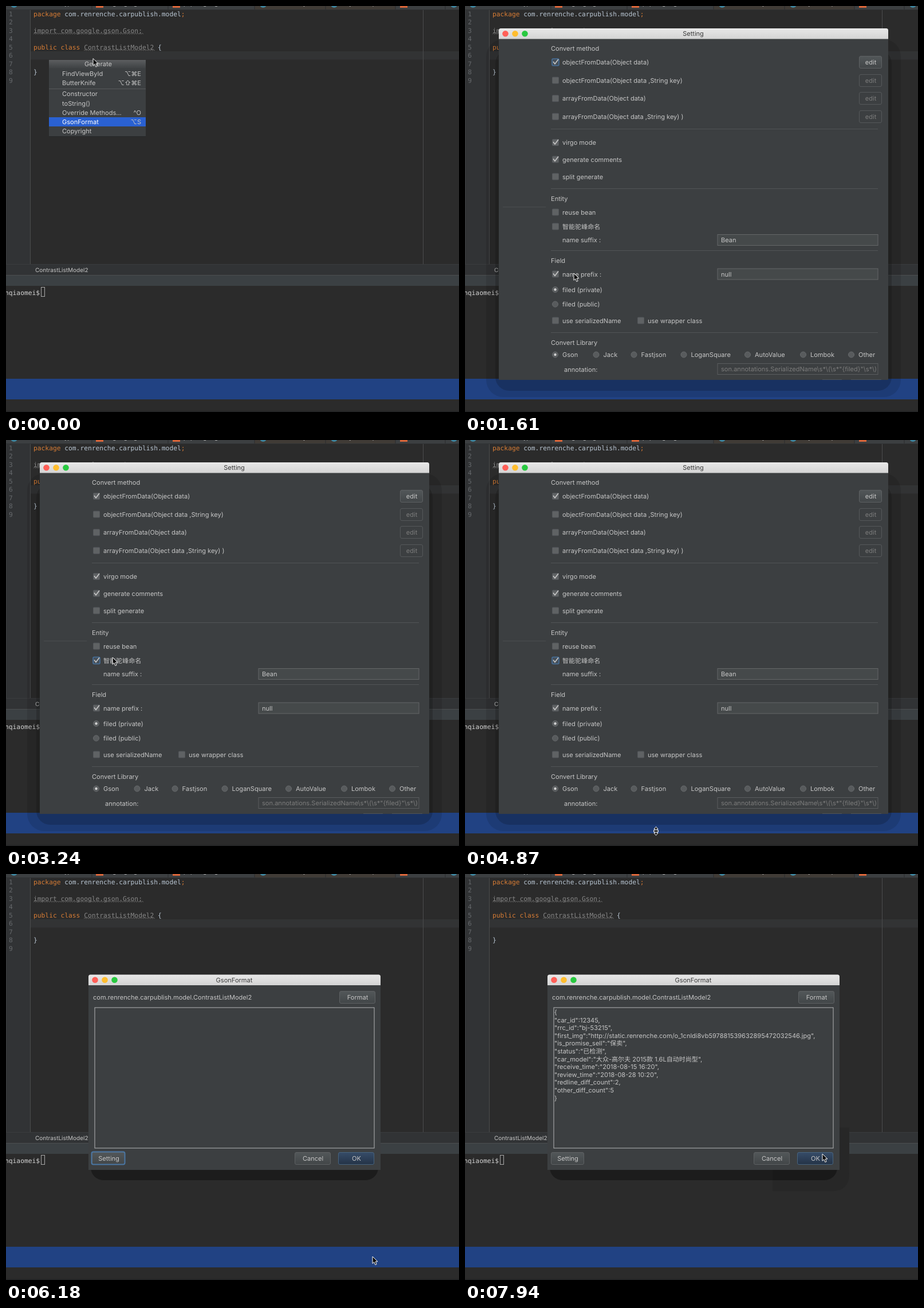
Recreate the animation shown at these times as an HTML page. Size 791 px wide and 708 px high, loop 8000 ms.

```html
<!DOCTYPE html>
<html lang="en">
<head>
<meta charset="utf-8">
<title>Generate a model class from JSON</title>
<style>
html, body { margin: 0; width: 100%; height: 100%; overflow: hidden; background: #2b2b2b; }
svg { display: block; width: 791px; height: 708px; }
text { font: 11.05px Inter, "Noto Sans CJK SC", "Noto Sans CJK", "DejaVu Sans", sans-serif; fill: #c6c6c6; white-space: pre; text-rendering: geometricPrecision; }
.code { font: 11.27px "DejaVu Sans Mono", monospace; fill: #b9c6d3; }
.shell { fill: #d2d2d2; }
.kw { fill: #d67c35; }
.unused { fill: #868686; }
.num { fill: #65686b; }
.small { font-size: 10px; }
.title { fill: #3c3c3c; }
.off { fill: #7c7c7c; }
.mid { text-anchor: middle; }
.end { text-anchor: end; }
.timed { animation: 8s step-end infinite; }
</style>
</head>
<body>
<svg id="stage" viewBox="0 0 791 708">
  <defs>
    <linearGradient id="bar" x2="0" y2="1"><stop stop-color="#e8e8e8"/><stop offset="1" stop-color="#d4d4d4"/></linearGradient>
    <linearGradient id="head" x2="0" y2="1"><stop stop-color="#5c5e60"/><stop offset="1" stop-color="#3e4143"/></linearGradient>
    <linearGradient id="btn" x2="0" y2="1"><stop stop-color="#525759"/><stop offset="1" stop-color="#424648"/></linearGradient>
    <linearGradient id="main" x2="0" y2="1"><stop stop-color="#364c68"/><stop offset="1" stop-color="#243347"/></linearGradient>
  </defs>
</svg>
<script>
const LOOP = 8000;
const stage = document.getElementById('stage');
const sheet = document.createElement('style');

const pct = ms => (ms / LOOP * 100).toFixed(3) + '%';
const attrs = o => Object.entries(o).map(([k, v]) => `${k}="${v}"`).join(' ');
const rect = (x, y, w, h, fill, more = {}) =>
  `<rect ${attrs({ x, y, width: w, height: h, fill, ...more })}/>`;
const circle = (cx, cy, r, fill, more = {}) => `<circle ${attrs({ cx, cy, r, fill, ...more })}/>`;
const path = (d, stroke, width = 1, fill = 'none') =>
  `<path ${attrs({ d, stroke, 'stroke-width': width, fill })}/>`;
const text = (x, y, str, cls = '') => `<text x="${x}" y="${y}" class="${cls}">${str}</text>`;
const hline = (x1, x2, y, color = '#515456') => path(`M${x1} ${y}H${x2}`, color);

// Wraps content that is visible only during the given [from, to] spans
let timedCount = 0;
function timed(content, ...spans) {
  const name = 'show' + timedCount++;
  const steps = spans.map(([a, b]) => `${pct(a)}{opacity:1}${pct(b)}{opacity:0}`).join('');
  sheet.textContent += `@keyframes ${name}{0%{opacity:0}${steps}}\n`;
  return `<g class="timed" style="animation-name:${name}">${content}</g>`;
}

function button(x, y, w, label, kind = '') {
  const fill = { main: 'url(#main)', off: 'none' }[kind] || 'url(#btn)';
  const stroke = { main: '#48647e', off: '#55585a' }[kind] || '#5e6163';
  return rect(x + .5, y + .5, w - 1, 21, fill, { stroke, rx: 2.5 }) +
    text(x + w / 2 + .5, y + 15, label, 'mid ' + kind);
}
const field = (y, str, off) =>
  rect(441, y, 280, 19, off ? '#3c3f41' : '#45494a', { stroke: off ? '#5a5d5f' : '#646768' }) +
  text(447, y + 13.5, str, off ? 'off' : '');
const tick = (x, y) => path(`M${x + 3} ${y - 1}l3 4 6-8`, '#c8c8c8', 1.6);
const box = (x, y, checked) =>
  rect(x + .5, y - 5.5, 11, 11, '#5f6264', { rx: 1, stroke: '#53565a' }) + (checked ? tick(x - 1, y) : '');
const focusBox = y =>
  rect(152, y - 6, 12, 12, '#46505a', { rx: 2, stroke: '#456f9b', 'stroke-width': 1.6 }) + tick(151, y);
const check = (x, y, label, checked) => box(x, y, checked) + text(x + 18, y + 4, label);
const radio = (cx, y, label, on) =>
  circle(cx, y, 5, '#585b5d', { stroke: '#676a6c' }) + (on ? circle(cx, y, 2.2, '#d0d0d0') : '') +
  text(cx + 12.5, y + 4, label);
const shadow = (x, y, right, bottom, r, alpha) =>
  rect(x, y, right - x, bottom - y, '#000', { rx: r, opacity: alpha });

function windowFrame(x, y, right, bottom, title) {
  const lights = ['#ff5f57', '#ffbd2e', '#28c940'];
  return rect(x, y + 8, right - x, bottom - y - 8, '#3c3f41') +
    path(`M${x} ${y + 18.5}v-15q0-3.5 3.5-3.5H${right - 3.5}q3.5 0 3.5 3.5v15z`, 'none', 0, 'url(#bar)') +
    lights.map((c, i) => circle(x + 11.5 + 17 * i, y + 9.3, 5.3, c)).join('') +
    text((x + right) / 2 - .5, y + 13.3, title, 'title mid');
}

function zigzag(x1, x2, y) {
  let d = `M${x1} ${y}`;
  for (let x = x1; x < x2; x += 4) d += 'l2-1.6 2 1.6';
  return path(d, '#707070', .8);
}

function editor() {
  const span = (cls, s) => `<tspan class="${cls}">${s}</tspan>`;
  const row = n => 18 + (n - 1) * 14.45;
  const lines = {
    1: span('kw', 'package ') + 'com.renrenche.carpublish.model' + span('kw', ';'),
    3: span('unused', 'import com.google.gson.Gson;'),
    5: span('kw', 'public class ') + span('unused', 'ContrastListModel2') + ' {',
    8: '}'
  };
  let out = rect(0, 0, 791, 708, '#2b2b2b') + rect(0, 0, 42, 451, '#313335') +
    rect(43, 79, 748, 14.5, '#323334') +
    path('M42.5 6V451M728.5 6V451', '#4b4c4d') + path('M.5 6V451', '#3a3c3e');
  for (let n = 1; n <= 9; n++) out += text(5, row(n), n, 'code num');
  for (const n in lines) out += text(48, row(n), lines[n], 'code');
  out += zigzag(48, 238, 49) + zigzag(136, 258, 78);

  // Lower edge of the tab strip
  out += rect(0, 0, 791, 6, '#3c3f41') + rect(434, 0, 246, 6, '#403b36') + hline(0, 791, 6.5, '#303234');
  out += path('M150 0v6M283 0v6M434 0v6M558 0v6M680 0v6M767 0v6', '#2b2d2e');
  out += [14, 449, 573, 782].map(x => circle(x, -3, 6, '#3e86a0')).join('') +
    [157, 291, 688].map(x => rect(x, 0, 13, 3, '#d8663a')).join('');
  out += [[80, 'CarType'], [175, 'img_tag_bg'], [310, 'pop_img_tag'], [466, 'MainActivity'], [590, 'MyCarAdapter']]
    .map(([x, s]) => text(x, -1, s, 'small')).join('');

  // Breadcrumb, tool bar and terminal
  out += rect(0, 451, 791, 18, '#313335') + hline(0, 791, 450.5, '#3a3c3e') +
    text(51, 464, 'ContrastListModel2', 'small') +
    rect(0, 470, 791, 18, '#3b4043') + hline(0, 791, 469.5, '#4b4e50') +
    text(-2, 503.5, 'nqiaomei$', 'code shell') +
    rect(61.5, 490.5, 6, 16, 'none', { stroke: '#a8a8a8' }) +
    rect(0, 650, 791, 36, '#214283') + rect(0, 706, 791, 2, '#242526');
  return out;
}

function popup() {
  const items = [
    [122, 'FindViewById', '⌥⌘E'], [138.3, 'ButterKnife', '⌥⇧⌘E'], [157.3, 'Constructor'],
    [173.5, 'toString()'], [189.7, 'Override Methods...', '^O'], [206, 'GsonFormat', '⌥S'], [222.2, 'Copyright']
  ];
  return rect(75, 94, 169, 133, '#3c3f41') + rect(75, 94, 169, 15, 'url(#head)') +
    path('M75 227.5H244', '#262829') + text(161, 105.3, 'Generate', 'mid') +
    hline(75, 244, 144.5, '#57595b') + rect(75, 194, 169, 16, '#2a61d2') +
    items.map(([y, name, keys]) => {
      const style = name === 'GsonFormat' ? '" style="fill:#fff' : '';
      return text(98, y, name, style) + (keys ? text(236, y, keys, 'end') : '');
    }).join('');
}

function formatDialog() {
  const json = [
    '{', '"car_id":12345,', '"rrc_id":"bj-53215",',
    '"first_img":"http://static.renrenche.com/o_1cnldi8vb597881539632895472032546.jpg",',
    '"is_promise_sell":"保卖",', '"status":"已检测",',
    '"car_model":"大众-高尔夫 2015款 1.6L自动时尚型",',
    '"receive_time":"2018-08-15 16:20",', '"review_time":"2018-08-28 10:20",',
    '"redline_diff_count":2,', '"other_diff_count":5', '}'
  ];
  return shadow(148, 480, 650, 534, 22, .34) +
    windowFrame(144, 175.5, 654, 516, 'GsonFormat') +
    text(152, 218.5, 'com.renrenche.carpublish.model.ContrastListModel2') +
    button(582, 204, 63, 'Format') +
    rect(155, 233, 488, 245, 'none', { stroke: '#b4b6b7' }) +
    button(150, 485, 58, 'Setting') + button(504, 485, 63, 'Cancel') + button(580, 485, 63, 'OK', 'main') +
    timed(rect(149.5, 484.5, 58, 22, 'none', { rx: 3, stroke: '#4a76a3', 'stroke-width': 2 }), [1610, 6910]) +
    timed(path('M156.5 235V248', '#bbb'), [140, 730], [1320, 1610], [6910, 7210]) +
    timed(json.map((s, i) => text(156, 245 + i * 13.6, s)).join(''), [7210, LOOP]);
}

function settingDialog() {
  const head = (y, s) => text(150, y + 4, s);
  const methods = ['(Object data)', '(Object data ,String key)', '(Object data)', '(Object data ,String key) )'];
  const libraries = [[157.5, 'Gson'], [229, 'Jack'], [295, 'Fastjson'], [382, 'LoganSquare'],
    [493.5, 'AutoValue'], [590.5, 'Lombok'], [674.5, 'Other']];
  const short = shadow(37, 58, 761, 682, 30, .1) + shadow(53, 76, 745, 671, 24, .17);
  const tall = shadow(37, 58, 761, 707, 30, .1) + shadow(65, 80, 734, 698, 22, .28);
  const footer = rect(59, 651, 680, 28.5, '#3c3f41') +
    button(623, 650.5, 36, 'OK', 'main') + button(673, 650.5, 55, 'Cancel');
  return timed(short, [1610, 5020]) + timed(tall, [5020, 6180]) +
    windowFrame(59, 39, 739, 652, 'Setting') +
    head(73.5, 'Convert method') +
    methods.map((s, i) => {
      const y = 98 + i * 31.6;
      return check(152, y, (i < 2 ? 'objectFromData' : 'arrayFromData') + s, !i) +
        button(688, Math.round(y) - 11, 40, 'edit', i ? 'off' : '');
    }).join('') +
    [214.5, 318.5, 426.5, 569.5].map(y => hline(150, 721, y)).join('') + hline(66, 141, 350.5, '#4a4d4f') +
    check(152, 238, 'virgo mode', true) + check(152, 267.5, 'generate comments', true) +
    check(152, 297.5, 'split generate') +
    head(336, 'Entity') + check(152, 359.5, 'reuse bean') + check(152, 384.5, '智能驼峰命名') +
    text(170, 412, 'name suffix :') + field(398.5, 'Bean') +
    head(444, 'Field') + check(152, 467.5, 'name prefix :', true) + field(458, 'null') +
    radio(157.5, 494.5, 'filed (private)', true) + radio(157.5, 520, 'filed (public)') +
    check(152, 548.5, 'use serializedName') + check(301, 548.5, 'use wrapper class') +
    head(587, 'Convert Library') +
    libraries.map(([x, s], i) => radio(x, 608, s, !i)).join('') +
    text(173, 637.5, 'annotation:') +
    field(623.5, 'son.annotations.SerializedName\\s*\\(\\s*"{filed}"\\s*\\)', true) +
    hline(624, 658, 651.5) + hline(674, 727, 651.5) +
    timed(focusBox(98), [1610, 3100]) + timed(focusBox(384.5), [3100, 6180]) +
    timed(footer, [5020, 6180]);
}

function pointer() {
  const stops = [
    [0, 152, 91.5], [430, 152, 104], [570, 155, 170], [730, 160, 290], [880, 163, 400], [1020, 162, 465],
    [1170, 160, 484], [1320, 160, 486], [1610, 190, 466], [1760, 266.5, 371], [1910, 262, 373], [2060, 245, 380],
    [2210, 228, 386], [2350, 212, 390], [2500, 202, 390], [2650, 194, 389], [2800, 186, 379],
    [3250, 245, 480], [3390, 310, 598], [3690, 323, 628], [3840, 331, 645],
    [4870, 329, 674], [5160, 335, 682], [5310, 400, 684], [5450, 500, 682], [5600, 590, 676],
    [5750, 632, 668], [5890, 640, 667], [6330, 628, 640], [6470, 570, 545], [6620, 480, 430],
    [6770, 415, 350], [6910, 400, 335], [7360, 440, 370], [7500, 520, 425], [7650, 590, 470],
    [7790, 620, 486], [7940, 624, 488]
  ];
  sheet.textContent += '@keyframes move{' +
    stops.map(([t, x, y]) => `${pct(t)}{transform:translate(${x}px,${y}px)}`).join('') + '}';
  const arrow = path('M0 0V12.3l2.8-2.6 2 4.8 2.3-1-2-4.6H9z', '#fff', 1, '#0a0a0a');
  const resize = path('M4.5 .3l3.6 4.4H5.6v1.8H8.5v2.8H5.6v1.8h2.5L4.5 15.5.9 11.1h2.5V9.3H.5V6.5H3.4V4.7H.9z',
    '#fff', 1, '#111');
  return '<g class="timed" style="animation-name:move">' +
    timed(arrow, [0, 4130], [5160, LOOP]) + timed(resize, [4130, 5160]) + '</g>';
}

const halo = shadow(128, 186, 671, 552.5, 32, .11);
const partHalo = path('M654 442h17v80q0 31-31 31H537V516H654z', 'none', 0, '#272727');

stage.innerHTML += editor() + timed(popup(), [0, 140]) +
  timed(halo, [280, 1610]) + timed(partHalo, [7790, LOOP]) +
  timed(formatDialog(), [140, LOOP]) + timed(settingDialog(), [1610, 6180]) + pointer();
document.head.append(sheet);
</script>
</body>
</html>
```
